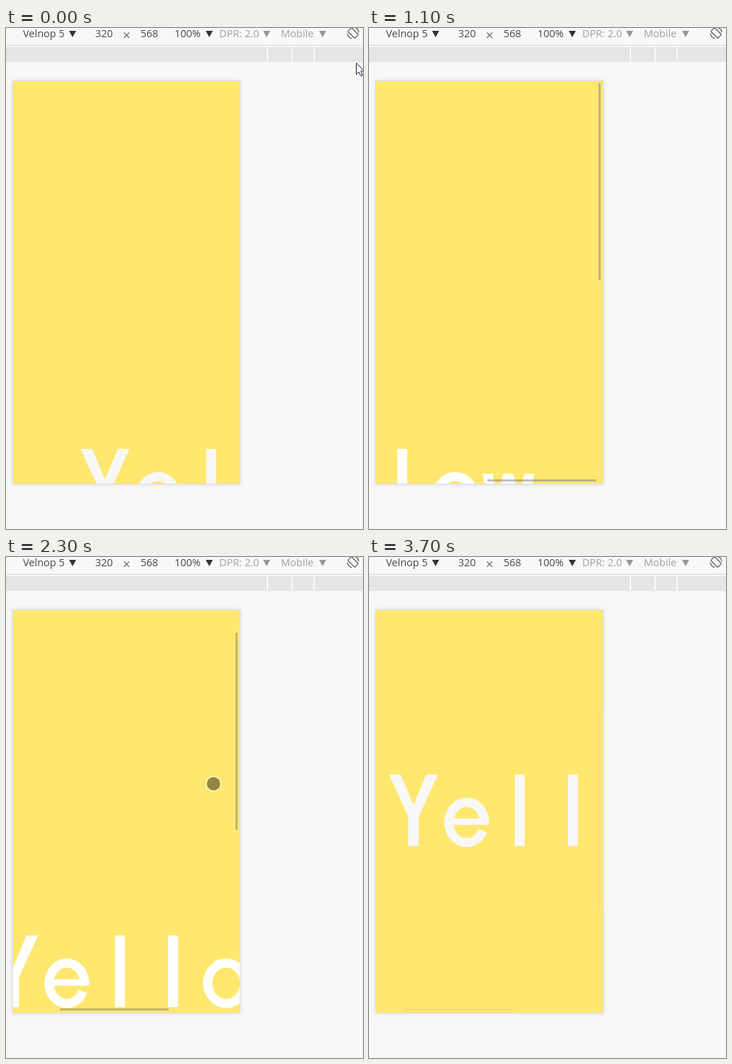
Animation, 504 px wide and 707 px high, one loop 4.2 s. Source, as an HTML page with a canvas:

```html
<!DOCTYPE html>
<html lang="en">
<head>
<meta charset="utf-8">
<title>Yellow</title>
<style>
  html, body { margin: 0; width: 100%; height: 100%; overflow: hidden; background: #f8f8f8; }
  canvas { display: block; }
</style>
</head>
<body>
<canvas id="stage" width="504" height="707" role="img" aria-label="Yellow"></canvas>
<script>
const ctx = document.getElementById('stage').getContext('2d');
const LOOP = 4200, STEP = 100;
const VIEW = { x: 10, y: 75, w: 320, h: 568 };
const PITCH = 75;

// Keys are [step, value, ...], linear in between.
const scrollKeys = [
  [0, 0, 0], [5, 0, 0], [6, 69, 0], [7, 187, 0], [8, 232, 0], [9, 280, 0], [10, 306, 0], [11, 318, 0],
  [17, 318, 0], [18, 276, 0], [19, 191, 0], [20, 132, 0], [22, 130, 0],
  [23, 129, 60], [24, 129, 125], [25, 129, 180], [26, 129, 215],
  [27, 125, 223], [28, 109, 245], [29, 90, 270], [30, 77, 287]
];
const touchKeys = [
  [[3, 300, 360], [4, 256, 408], [5, 240, 416.5], [6, 157, 416.5], [7, 39.5, 416.5], [8, -4, 416.5]],
  [[15, 60, 429], [17, 98, 429], [18, 150, 429], [19, 235, 429], [20, 294, 429],
   [21, 294, 415], [22, 294, 380], [23, 293, 320], [24, 293, 255], [25, 293, 200], [26, 293, 165],
   [27, 297, 158], [28, 312, 138], [29, 330, 115], [30, 342, 100]]
];
const arrowKeys = [
  [[0, 494, 49], [1, 450, 140], [2, 375, 260]],
  [[31, 410, 101], [32, 469, 104]]
];

function sample(keys, s) {
  let i = 0;
  while (i < keys.length - 1 && keys[i + 1][0] <= s) i++;
  const a = keys[i], b = keys[i + 1] || a;
  const k = a === b ? 0 : Math.max(0, (s - a[0]) / (b[0] - a[0]));
  return [1, 2].map(n => a[n] + (b[n] - a[n]) * k);
}

function active(tracks, s) {
  const keys = tracks.find(t => s >= t[0][0] && s <= t[t.length - 1][0]);
  return keys && sample(keys, s);
}

function rect(x, y, w, h, color) {
  ctx.fillStyle = color;
  ctx.fillRect(x, y, w, h);
}

function path(points, close) {
  ctx.beginPath();
  points.forEach(([x, y]) => ctx.lineTo(x, y));
  if (close) ctx.closePath();
}

function label(text, x, color) {
  ctx.fillStyle = color;
  ctx.fillText(text, x, 13);
}

function triangle(x, color) {
  path([[x - 5, 4], [x + 5, 4], [x, 13]], true);
  ctx.fillStyle = color;
  ctx.fill();
}

function rotateIcon() {
  ctx.save();
  ctx.translate(490, 7);
  ctx.strokeStyle = '#555';
  ctx.lineWidth = 1.2;
  ctx.beginPath();
  ctx.arc(0, 0, 8, -1.35, -0.1);
  ctx.moveTo(-8, 0.8);
  ctx.arc(0, 0, 8, 3.04, 1.8, true);
  ctx.stroke();
  ctx.rotate(-Math.PI / 4);
  ctx.beginPath();
  ctx.roundRect(-3.7, -7, 7.4, 14, 1.2);
  ctx.stroke();
  ctx.restore();
}

function toolbar() {
  const dark = '#484848', gray = '#a0a0a0';
  ctx.font = '14.5px "Open Sans", "Noto Sans", sans-serif';
  label('Velnop 5', 24, dark);
  label('320', 126, dark);
  label('568', 190, dark);
  label('100%', 238, dark);
  label('DPR: 2.0', 301, gray);
  label('Mobile', 388, gray);
  [94, 287].forEach(x => triangle(x, '#333'));
  [368, 447].forEach(x => triangle(x, '#969696'));
  ctx.strokeStyle = '#666';
  ctx.lineWidth = 1.1;
  ctx.beginPath();
  ctx.moveTo(166.5, 6.5); ctx.lineTo(174, 14);
  ctx.moveTo(174, 6.5); ctx.lineTo(166.5, 14);
  ctx.stroke();
  rotateIcon();
  rect(0, 24, 504, 1, '#d2d2d2');
  rect(0, 27, 504, 21, '#e5e5e5');
  [368, 403, 434].forEach(x => rect(x, 26, 2, 21, '#fafafa'));
}

function ring(rx, ry, from, to) {
  ctx.lineWidth = 13;
  ctx.beginPath();
  ctx.ellipse(0, -33.5, rx, ry, 0, from, to);
  ctx.stroke();
}

// Glyphs sit on the baseline, centred in their cell.
const glyphs = {
  Y() {
    path([[-34.5, -101], [-18, -101], [0, -58], [18, -101], [34.5, -101],
      [7.5, -42], [7.5, 0], [-7.5, 0], [-7.5, -42]], true);
    ctx.fill();
  },
  e() {
    ring(25, 28.5, 0.42, Math.PI * 2);
    ctx.fillRect(-25, -39, 56.5, 9);
  },
  l() { ctx.fillRect(-7, -101, 14, 101); },
  o() { ring(26, 28.5, 0, Math.PI * 2); },
  w() {
    ctx.beginPath();
    ctx.rect(-40, -66, 80, 66);
    ctx.clip();
    path([[-31.5, -76], [-16, 0], [0, -66], [16, 0], [31.5, -76]]);
    ctx.lineWidth = 14;
    ctx.stroke();
  }
};

function word(left, base, color) {
  ctx.fillStyle = ctx.strokeStyle = color;
  [...'Yellow'].forEach((ch, i) => {
    ctx.save();
    ctx.translate(left + i * PITCH, base);
    glyphs[ch]();
    ctx.restore();
  });
}

function scrollbars(sx, sy, s) {
  if (s < 6) return;
  ctx.globalAlpha = s < 36 ? 1 : s < 37 ? 0.45 : 0.14;
  rect(324, Math.round(78 + sy * 0.487), 3, 278, 'rgba(128,128,128,.5)');
  rect(Math.round(14 + sx * 0.481), 637, 154, 3, 'rgba(128,128,128,.5)');
  ctx.globalAlpha = 1;
}

function page(s) {
  const [sx, sy] = sample(scrollKeys, s);
  ctx.save();
  ctx.shadowColor = 'rgba(0,0,0,.12)';
  ctx.shadowBlur = 6;
  rect(VIEW.x - 1, VIEW.y - 1, VIEW.w + 2, VIEW.h + 2, '#dedede');
  ctx.restore();
  ctx.save();
  ctx.beginPath();
  ctx.rect(VIEW.x, VIEW.y, VIEW.w, VIEW.h);
  ctx.clip();
  rect(VIEW.x, VIEW.y, VIEW.w, VIEW.h, '#ffe770');
  word(139.8 - sx, 695 - sy, s < 6 || s > 28 ? '#f8f8f8' : '#fffffc');
  scrollbars(sx, sy, s);
  ctx.restore();
}

function touch([x, y]) {
  ctx.beginPath();
  ctx.arc(x, y, 9.5, 0, Math.PI * 2);
  ctx.fillStyle = 'rgba(0,0,0,.42)';
  ctx.fill();
  ctx.beginPath();
  ctx.arc(x, y, 10.3, 0, Math.PI * 2);
  ctx.strokeStyle = 'rgba(255,255,255,.6)';
  ctx.lineWidth = 1.6;
  ctx.stroke();
}

function arrow([x, y]) {
  ctx.save();
  ctx.translate(x + 0.5, y + 0.5);
  path([[0, 0], [0, 16], [3.7, 12.5], [6.2, 18], [8.8, 17], [6.4, 11.4], [11.3, 11.3]], true);
  ctx.fillStyle = '#fff';
  ctx.fill();
  ctx.strokeStyle = '#181828';
  ctx.lineWidth = 1;
  ctx.stroke();
  ctx.restore();
}

function draw(now) {
  const s = Math.floor((now % LOOP) / STEP);
  rect(0, 0, 504, 707, '#f8f8f8');
  toolbar();
  page(s);
  const finger = active(touchKeys, s), pointer = active(arrowKeys, s);
  if (finger) touch(finger);
  if (pointer) arrow(pointer);
}

const start = performance.now();
function tick() {
  draw(performance.now() - start);
  requestAnimationFrame(tick);
}
tick();
</script>
</body>
</html>
```
